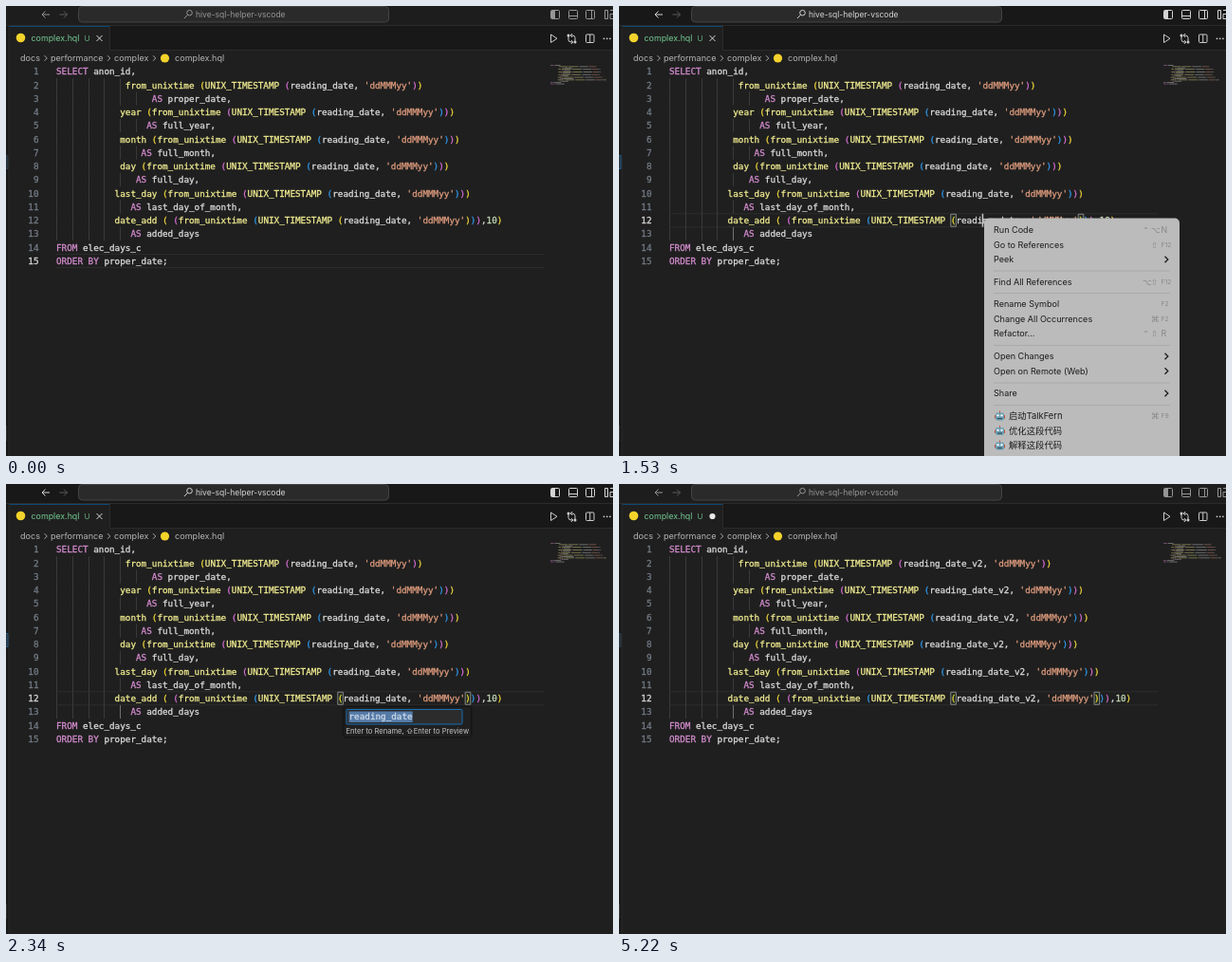
Animation of 640 by 474 pixels, one loop 5250 ms. Source, as an HTML page with a canvas:

```html
<!DOCTYPE html>
<html lang="en">
<head>
<meta charset="utf-8">
<title>Rename symbol</title>
<style>
html, body { margin: 0; width: 640px; height: 474px; overflow: hidden; background: #1f1f1f; }
canvas { position: absolute; left: 0; top: 0; }
</style>
</head>
<body>
<canvas id="editor" width="640" height="474"></canvas>
<canvas id="menu" width="640" height="474"></canvas>
<script>
const LOOP = 5250, CHAR = 5.6, LEFT = 53, PITCH = 14.25;
// moments of the user's actions, in ms
const CLICK = 240, MENU = 420, HOVER = 1560, FADE = 1950, GONE = 2160;
const RENAME = 2250, DESELECT = 2730, KEYS = [3210, 3420, 3630], ENTER = 3840, EDIT = 4230, BLUR = 5040;
const UI = 'Inter, "Noto Sans CJK SC", "Noto Sans CJK", sans-serif';
const SYMBOLS = '"DejaVu Sans", sans-serif';
const MONO = '"DejaVu Sans Mono", monospace';
const BRACKETS = ['#f5dc3c', '#da70d6', '#2f9cf0'];
const menuCanvas = document.getElementById('menu');
const editor = document.getElementById('editor').getContext('2d');
const menu = menuCanvas.getContext('2d');
let g = editor;

const lineY = n => 69 + (n - 1) * PITCH;
const colX = c => LEFT + c * CHAR;

function rect(x, y, w, h, color) {
  g.fillStyle = color;
  g.fillRect(x, y, w, h);
}

function round(x, y, w, h, r, fill, stroke) {
  g.beginPath();
  g.roundRect(x, y, w, h, r);
  if (fill) { g.fillStyle = fill; g.fill(); }
  if (stroke) { g.strokeStyle = stroke; g.lineWidth = 1; g.stroke(); }
}

function dot(x, y, r, color) {
  g.fillStyle = color;
  g.beginPath();
  g.arc(x, y, r, 0, 7);
  g.fill();
}

function path(d, color, width = 1) {
  g.strokeStyle = color;
  g.lineWidth = width;
  g.stroke(new Path2D(d));
}

// y is the middle of the capital letters
function text(s, x, y, color, size = 9.1, family = UI) {
  g.font = `${size}px ${family}`;
  g.fillStyle = color;
  g.fillText(s, x, y + size * .36);
}

// a hairline outline gives the code its slightly heavier weight
function mono(s, x, y, color) {
  text(s, x, y, color, 9.3, MONO);
  g.strokeStyle = color;
  g.lineWidth = .3;
  g.strokeText(s, x, y + 9.3 * .36);
}

const chevron = (x, y, s, color, w) => path(`M${x} ${y - s}l${s} ${s}l${-s} ${s}`, color, w);

function codeLines(name) {
  const call = `from_unixtime (UNIX_TIMESTAMP (${name}, 'ddMMMyy')`;
  return [
    [0, 'SELECT anon_id,'],
    [13, call + ')'], [18, 'AS proper_date,'],
    [12, `year (${call}))`], [17, 'AS full_year,'],
    [12, `month (${call}))`], [16, 'AS full_month,'],
    [12, `day (${call}))`], [15, 'AS full_day,'],
    [11, `last_day (${call}))`], [14, 'AS last_day_of_month,'],
    [11, `date_add ( (${call})),10)`], [14, 'AS added_days'],
    [0, 'FROM elec_days_c'], [0, 'ORDER BY proper_date;']
  ];
}

function tokens(line) {
  let depth = 0;
  return [...line.matchAll(/'[^']*'|\w+(?= ?\()|\w+|[()]|[^\s\w()']+/g)].map(m => {
    const s = m[0];
    let color = '#dadada';
    if (s == '(') color = BRACKETS[depth++ % 3];
    else if (s == ')') color = BRACKETS[--depth % 3];
    else if (s[0] == "'") color = '#dc9a7c';
    else if (/^(SELECT|AS|FROM|ORDER|BY)$/.test(s)) color = '#d08acb';
    else if (/^\d+$/.test(s)) color = '#c2d6b4';
    else if (/^ ?\(/.test(line.slice(m.index + s.length))) color = '#f0ec90';
    return { s, color, col: m.index };
  });
}

function drawFrame(focused, renamed) {
  const title = focused ? '#d4d4d4' : '#959595';
  rect(0, 0, 640, 474, '#1f1f1f');
  rect(0, 0, 640, 46, '#181818');
  if (!focused) rect(0, 0, 640, 20, '#1d1d1d');
  rect(0, 20, 640, 1, '#2b2b2b');

  path('M46 9h-8m3.5 -3.5l-3.5 3.5l3.5 3.5', title);
  path('M56.5 9h8m-3.5 -3.5l3.5 3.5l-3.5 3.5', '#5a5a5a');
  round(76.5, .5, 327, 16.5, 4, '#2a2a2a', '#444444');
  g.beginPath();
  g.arc(193.5, 7.2, 2.8, 0, 7);
  g.strokeStyle = title;
  g.stroke();
  path('M191.5 9.3l-3.5 3.7', title);
  text('hive-sql-helper-vscode', 200, 8.8, title, 8.5);

  for (const x of [574.5, 593.5, 611.5]) round(x, 4.5, 9, 9, 1, null, title);
  rect(575, 5, 4, 8, title);
  path('M594 10.5h8M617.5 5v8', title);
  path('M631.5 4.5h3v9h-3zM637 4.5h4M637 8.5h4v5h-4z', title);

  rect(3, 21, 106, 26, '#1f1f1f');
  rect(3, 21, 106, 1, '#0d4a78');
  rect(109, 21, 1, 25, '#2b2b2b');
  rect(109, 46, 531, 1, '#2b2b2b');
  dot(15.5, 33.5, 4.8, '#f3d32b');
  text('complex.hql', 26.5, 34, '#73c991', 8.9);
  text('U', 82.5, 34, '#62aa7c', 8.2);
  if (renamed) dot(98.5, 34, 3.1, '#e8e8e8');
  else path('M95.5 31l6 6m0 -6l-6 6', '#d8d8d8');

  const tool = '#cccccc';
  path('M574.5 30v8.5l6.5 -4.25z', tool);
  path('M593 31v4.5q0 2.5 3 2.5h1.5m-1.7 -2l2 2l-2 2M600 37.5v-4q0 -2.5 -3 -2.5h-1.5m1.7 -2l-2 2l2 2', tool);
  dot(593, 31, 1.5, tool);
  dot(600, 38, 1.5, tool);
  round(611.5, 30, 8.5, 8.5, 1, null, tool);
  path('M615.75 30v8.5', tool);
  for (let i = 0; i < 3; i++) dot(630.5 + i * 3.2, 34.3, .9, tool);

  const crumb = '#b4b4b4';
  [['docs', 15], ['performance', 47], ['complex', 114], ['complex.hql', 178]]
    .forEach(([s, x]) => text(s, x, 55, crumb));
  for (const x of [40.5, 107, 155]) chevron(x, 55, 2.8, crumb, .9);
  dot(167.5, 55, 4.6, '#f3d32b');

  rect(0, 21, 3, 453, '#181818');
  rect(2.5, 21, 1, 453, '#2b2b2b');
  round(-5, 157.5, 7, 14, 0, '#25303a', focused ? '#245a86' : '#2e3a45');
  rect(0, 442, 1, 16, '#333333');
}

function drawCode(active, renamed) {
  const lines = codeLines(renamed ? 'reading_date_v2' : 'reading_date');
  const y = lineY(active);
  rect(LEFT, y - 7.5, 515, 1, '#2c2c2c');
  rect(LEFT, y + 6.5, 515, 1, '#2c2c2c');
  lines.forEach(([indent, line], i) => {
    const n = i + 1, y = lineY(n), no = String(n);
    mono(no, 34.5 - no.length * CHAR, y, n == active ? '#d6d6d6' : '#727a84');
    for (let c = 0; c < indent; c += 3) {
      const inner = active == 12 && n == 13 && c == 12;
      rect(Math.round(colX(c)), y - PITCH / 2, 1, PITCH, inner ? '#707070' : '#3a3a3a');
    }
    if (n == 12 && active == 12) {
      for (const c of [42, renamed ? 69 : 66])
        round(colX(indent + c), y - 6.5, CHAR, 13, 0, '#1f2a1f', '#888888');
    }
    for (const { s, color, col } of tokens(line)) {
      mono(s, colX(indent + col), y, color);
      g.globalAlpha = .45;
      rect(574 + (indent + col) * .7, 62 + i * 1.4, s.length * .7, .9, color);
      g.globalAlpha = 1;
    }
  });
}

const caret = (x, y) => rect(x - .7, y - 7, 1.5, 14, '#c4c4c4');

function drawRename(value, selected) {
  g.shadowColor = '#000000';
  g.shadowBlur = 3;
  round(356.5, 235, 133.5, 31, 2, '#202020');
  g.shadowBlur = 0;
  round(359, 237.5, 122, 15.5, 1, '#2c2c2c', '#176fb4');
  if (selected) rect(361.5, 239.5, value.length * CHAR, 11.5, '#557ba8');
  mono(value, 361.5, 245, selected ? '#cbd8e6' : '#dadada');
  if (!selected) rect(361.5 + value.length * CHAR, 239.5, 1, 11.5, '#e0e0e0');
  text('Enter to Rename, ⇧Enter to Preview', 358.5, 260, '#c4c4c4', 7.6, 'Inter, ' + SYMBOLS);
}

// label, y, modifiers, key ('>' opens a submenu), robot icon
const ITEMS = [
  ['Run Code', 236, '⌃⌥', 'N'], ['Go to References', 251.5, '⇧', 'F12'], ['Peek', 267, '', '>'],
  ['Find All References', 290.5, '⌥⇧', 'F12'],
  ['Rename Symbol', 314, '', 'F2'], ['Change All Occurrences', 329.5, '⌘', 'F2'],
  ['Refactor...', 345, '⌃⇧', 'R'],
  ['Open Changes', 369, '', '>'], ['Open on Remote (Web)', 384.5, '', '>'],
  ['Share', 408, '', '>'],
  ['启动TalkFern', 432, '⌘', 'F9', true], ['优化这段代码', 447.5, '', '', true],
  ['解释这段代码', 463, '', '', true]
];
const RENAME_ITEM = 4;

function robot(x, y) {
  rect(x - 5.5, y - 1, 11, 3.5, '#c4513f');
  rect(x - .5, y - 5.5, 1, 3, '#c4513f');
  round(x - 4.5, y - 3.5, 9, 8, 2, '#6b9db2');
  dot(x - 2, y - .7, 1.2, '#eef6f8');
  dot(x + 2, y - .7, 1.2, '#eef6f8');
  rect(x - 2.5, y + 2, 5, 1.2, '#33505c');
}

function drawMenu(hover) {
  round(385, 223.5, 206, 270, 5, '#bbbbbb');
  for (const y of [278.5, 302, 357, 396.5, 420]) rect(395, y, 186, 1, '#aaaaaa');
  ITEMS.forEach(([label, y, mods, key, bot], i) => {
    const on = i == hover;
    if (on) round(389, y - 7.8, 198, 15.6, 3, '#0a6fdc');
    const ink = on ? '#ffffff' : '#1c1c1c', soft = on ? '#ffffff' : '#878787';
    if (bot) robot(401.5, y);
    text(label, bot ? 411 : 395, y, ink, bot ? 9.35 : 9.05);
    if (key == '>') return chevron(575.5, y, 3.3, ink, 1.3);
    [...mods].forEach((m, j) => text(m, 561 - (mods.length - 1 - j) * 9, y, soft, 8.5, SYMBOLS));
    text(key, 571.5, y, soft, key.length > 1 ? 6.8 : 8.8);
  });
}

// the pointer runs down to the rename item, which flashes once when chosen
function hoveredItem(t) {
  if (t < HOVER || (t >= 1860 && t < 1920)) return -1;
  return Math.min(RENAME_ITEM, Math.floor((t - HOVER) / 45));
}

function draw(t) {
  const renamed = t >= EDIT;
  g = editor;
  drawFrame(t >= CLICK && t < BLUR, renamed);
  drawCode(t >= CLICK ? 12 : 15, renamed);
  const blinkOn = [[CLICK, 750], [1230, 1740], [ENTER, 4740]].some(([a, b]) => t >= a && t < b);
  if (blinkOn) caret(383.4, lineY(12));
  if (t >= RENAME && t < ENTER) {
    const typed = KEYS.filter(k => t >= k).length;
    drawRename('reading_date' + '_v2'.slice(0, typed), t < DESELECT);
  }

  g = menu;
  g.clearRect(0, 0, 640, 474);
  if (t < MENU || t >= GONE) return;
  drawMenu(hoveredItem(t));
  menuCanvas.style.opacity = Math.min(1, (GONE - t) / (GONE - FADE));
}

const start = performance.now();
function tick() {
  draw((performance.now() - start) % LOOP);
  requestAnimationFrame(tick);
}
tick();
</script>
</body>
</html>
```
